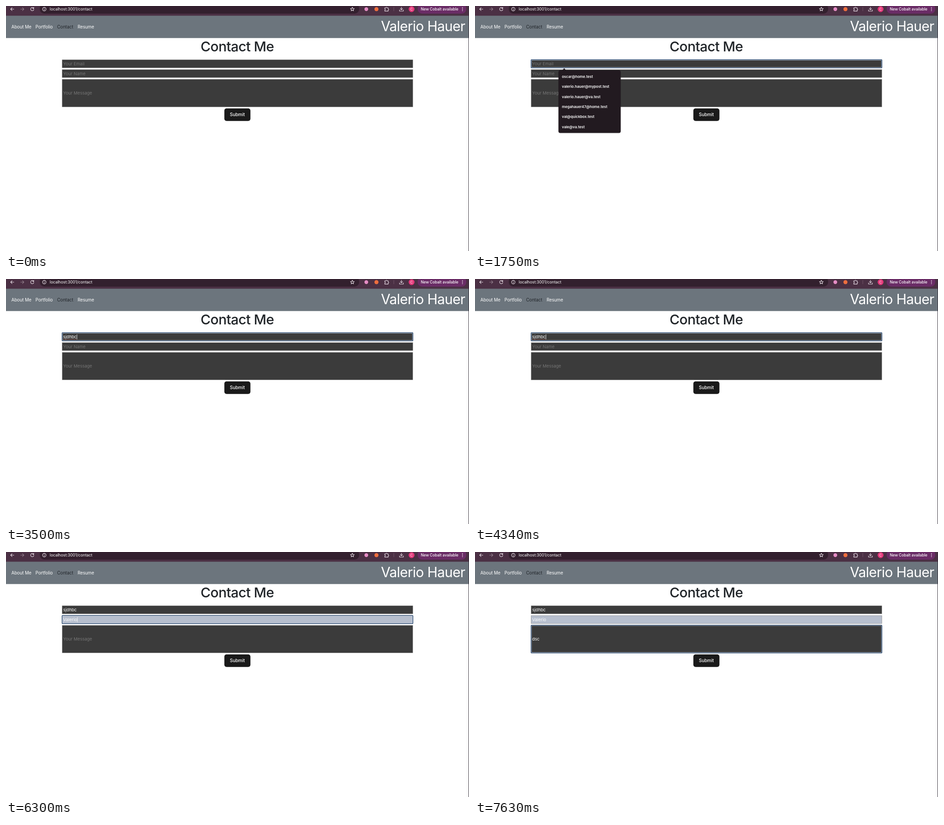
Recreate the animation shown at these times as an HTML page. Size 1028 px wide and 545 px high, loop 8 s.

```html
<!DOCTYPE html>
<html lang="en">
<head>
<meta charset="utf-8">
<title>Contact form</title>
<style>
  html, body { margin: 0; width: 100%; height: 100%; overflow: hidden; background: #fff; }
  svg { display: block; width: 1028px; height: 545px; }
  text { font-family: Inter, sans-serif; white-space: pre; }
  .nav { font-size: 9.7px; fill: #fff; }
  .title { font-size: 30.5px; letter-spacing: -.6px; }
  .field { font-size: 9.5px; }
  .item { font-size: 8px; font-weight: 600; fill: #fff; }
  .icon { fill: none; stroke: #e9dfe7; stroke-width: 1.1; stroke-linecap: round; stroke-linejoin: round; }
</style>
</head>
<body>
<svg viewBox="0 0 1028 545">
  <!-- browser toolbar -->
  <rect width="1028" height="22" fill="#4b3044"/>
  <rect x="75" y="-5" width="709" height="22" rx="10" fill="#33202e"/>
  <g class="icon">
    <path d="M17.500 7h-7m3-3.200L10.300 7l3.200 3.200"/>
    <path d="M32.500 7h7m-3-3.200L39.700 7l-3.200 3.200" opacity=".45"/>
    <path d="M61.300 5a3.600 3.600 0 1 0 .5 2.600M61.700 3v2.400h-2.400"/>
    <circle cx="85" cy="7" r="3.900"/>
    <path d="M85 6.800v2.200M85 4.900v.1"/>
    <path d="M769 2.700l1.300 2.800 3 .3-2.300 2 .7 3-2.700-1.600-2.700 1.600.7-3-2.300-2 3-.3z"/>
    <path d="M841 4h2.500a1.300 1.300 0 0 1 2.600 0h2.400v2.500a1.300 1.300 0 0 1 0 2.600v2.300H841V9a1.300 1.300 0 0 0 0-2.600z"/>
    <path d="M878 2.500v5.700m-2.500-2.400 2.500 2.500 2.500-2.500M873.700 8.500v2.700h8.600V8.500"/>
    <path d="M861 3v8" stroke="#7b6074" stroke-width=".8"/>
  </g>
  <circle cx="800" cy="7" r="4.200" fill="#e58cc4"/>
  <circle cx="822.500" cy="7" r="4.500" fill="#ee6e3e"/>
  <circle cx="900.500" cy="7" r="6.500" fill="#e5397b"/>
  <text x="900.500" y="9.600" font-size="7.500" fill="#fff" text-anchor="middle">C</text>
  <rect x="914" y="-4" width="108" height="21" rx="10" fill="#6a2c66"/>
  <text x="921" y="9.900" font-size="8.300" font-weight="500" fill="#fff">New Cobalt available</text>
  <g fill="#fff"><circle cx="1013.500" cy="3.700" r=".9"/><circle cx="1013.500" cy="7" r=".9"/><circle cx="1013.500" cy="10.300" r=".9"/></g>
  <text x="97" y="10" font-size="8.800" fill="#fff">localhost:3001/contact</text>

  <!-- page -->
  <rect y="21.600" width="1028" height="49.700" fill="#6c757d"/>
  <g class="nav">
    <text x="12" y="50.300">About Me</text>
    <text x="65.500" y="50.300">Portfolio</text>
    <text x="113.500" y="50.300" fill="#212529">Contact</text>
    <text x="159" y="50.300">Resume</text>
  </g>
  <text class="title" x="1019.500" y="55.500" fill="#fff" text-anchor="end">Valerio Hauer</text>
  <text class="title" x="513.500" y="100.500" font-weight="500" fill="#212529" text-anchor="middle">Contact Me</text>
  <rect x="484.800" y="227.700" width="57.900" height="28" rx="5" fill="#1a1a1a"/>
  <text x="513.700" y="245.200" font-size="10" font-weight="500" fill="#fff" text-anchor="middle">Submit</text>
  <g id="form"></g>
  <path d="M1027.500 0v545" stroke="#35303a"/>
</svg>
<script>
const LOOP = 8000, LEFT = 124.4, WIDTH = 779.2;
const fields = [
  { y: 119.3, h: 18.5, hint: 'Your Email', options: ['oscar@home.test', 'valerio.hauer@mypost.test', 'valerio.hauer@va.test',
    'megahauer47@home.test', 'val@quickbox.test', 'vale@va.test'], menu: 138.2 },
  { y: 141, h: 18.5, hint: 'Your Name', options: ['Valerio', 'Ned'], menu: 96.7 },
  { y: 162.7, h: 62, hint: 'Your Message', options: ['hello', 'test message', 'hi there', 'sdcsdc', 'testing'], menu: 122.2 }
];

// Each step overrides part of the state from its time on.
const steps = [
  [0, { values: ['', '', ''], focus: -1, menu: -1, hover: -1, caret: false, filled: false, spell: false, pick: false }],
  [140, { focus: 0, menu: 0, caret: true }],
  [700, { caret: false }],
  [1260, { caret: true }],
  [1750, { caret: false }],
  [2100, { values: ['sjdhb', '', ''], menu: -1, caret: true }],
  [2240, { values: ['sjdhbc', '', ''] }],
  [2730, { caret: false }],
  [3290, { caret: true }],
  [3360, { spell: true }],
  [3500, { hover: 2 }],
  [3640, { hover: -1 }],
  [3710, { hover: 1 }],
  [3780, { caret: false }],
  [3990, { hover: -1 }],
  [4340, { caret: true, hover: 1 }],
  [4410, { focus: 1, menu: 1, spell: false }],
  [4900, { caret: false }],
  [5390, { caret: true }],
  [5460, { hover: 2 }],
  [5600, { hover: -1 }],
  [5740, { values: ['sjdhbc', 'Valerio', ''], filled: true, pick: true }],
  [5950, { caret: false }],
  [6230, { caret: true, menu: -1, pick: false }],
  [6300, { hover: 2 }],
  [6580, { focus: 2, menu: 2, hover: -1 }],
  [6930, { values: ['sjdhbc', 'Valerio', 'ds'], menu: -1 }],
  [7070, { values: ['sjdhbc', 'Valerio', 'dsc'] }],
  [7630, { caret: false }]
];

const form = document.getElementById('form');
const pen = document.createElement('canvas').getContext('2d');
pen.font = '9.5px Inter, sans-serif';
const textWidth = s => pen.measureText(s).width;

const box = (x, y, w, h, style) => `<rect x="${x}" y="${y}" width="${w}" height="${h}" ${style}/>`;
const label = (x, y, s, style) => `<text x="${x}" y="${y}" ${style}>${s}</text>`;

function drawField(f, i, s) {
  const value = s.values[i], mid = f.y + f.h / 2;
  const fill = i === 1 && s.filled ? '#b7bfce' : '#3b3b3b';
  const edge = s.hover === i ? '#aaa' : '#858585';
  let out = box(LEFT + .35, f.y + .35, WIDTH - .7, f.h - .7, `fill="${fill}" stroke="${edge}" stroke-width=".7"`);
  if (s.focus === i) {
    out += box(LEFT + 1.1, f.y + 1.1, WIDTH - 2.2, f.h - 2.2, 'fill="none" stroke="#d5e2f2" stroke-width=".8"') +
      box(LEFT + .1, f.y + .1, WIDTH - .2, f.h - .2, 'rx="1.2" fill="none" stroke="#17375f" stroke-width="1.3"');
  }
  out += label(127, mid + 3.5, value || f.hint, `class="field" fill="${value ? '#fff' : '#757575'}"`);
  const end = 127 + textWidth(value);
  if (s.spell && i === 0) {
    out += `<path d="M127.500 ${mid + 5.6}H${end}" stroke="#e0524a" stroke-width=".9" stroke-dasharray="1 1" opacity=".7"/>`;
  }
  if (s.caret && s.focus === i) {
    out += box(s.pick ? 127 : end + .2, mid - 5.3, .8, 11, 'fill="#fff"');
  }
  return out;
}

function drawMenu(f, picked) {
  const row = 22.3, x = 185.3, y = f.y + f.h + 5.3, h = f.options.length * row + 5.4;
  return box(x, y + 1, f.menu, h, 'rx="4" fill="#000" opacity=".25"') +
    `<path d="M193.500 ${y + .3}l4.500-5 4.500 5z" fill="#221a20"/>` +
    box(x, y, f.menu, h, 'rx="4" fill="#221a20"') +
    (picked ? box(x, y + 2.7, f.menu, row, 'fill="#42383f"') : '') +
    f.options.map((s, i) => label(193, y + 17 + i * row, s, 'class="item"')).join('');
}

let shown = -1;
function frame(now) {
  const t = now % LOOP;
  const count = steps.filter(step => step[0] <= t).length;
  if (count !== shown) {
    shown = count;
    const s = Object.assign({}, ...steps.slice(0, count).map(step => step[1]));
    form.innerHTML = fields.map((f, i) => drawField(f, i, s)).join('') +
      (s.menu < 0 ? '' : drawMenu(fields[s.menu], s.pick));
  }
  requestAnimationFrame(frame);
}
frame(0);
</script>
</body>
</html>
```
